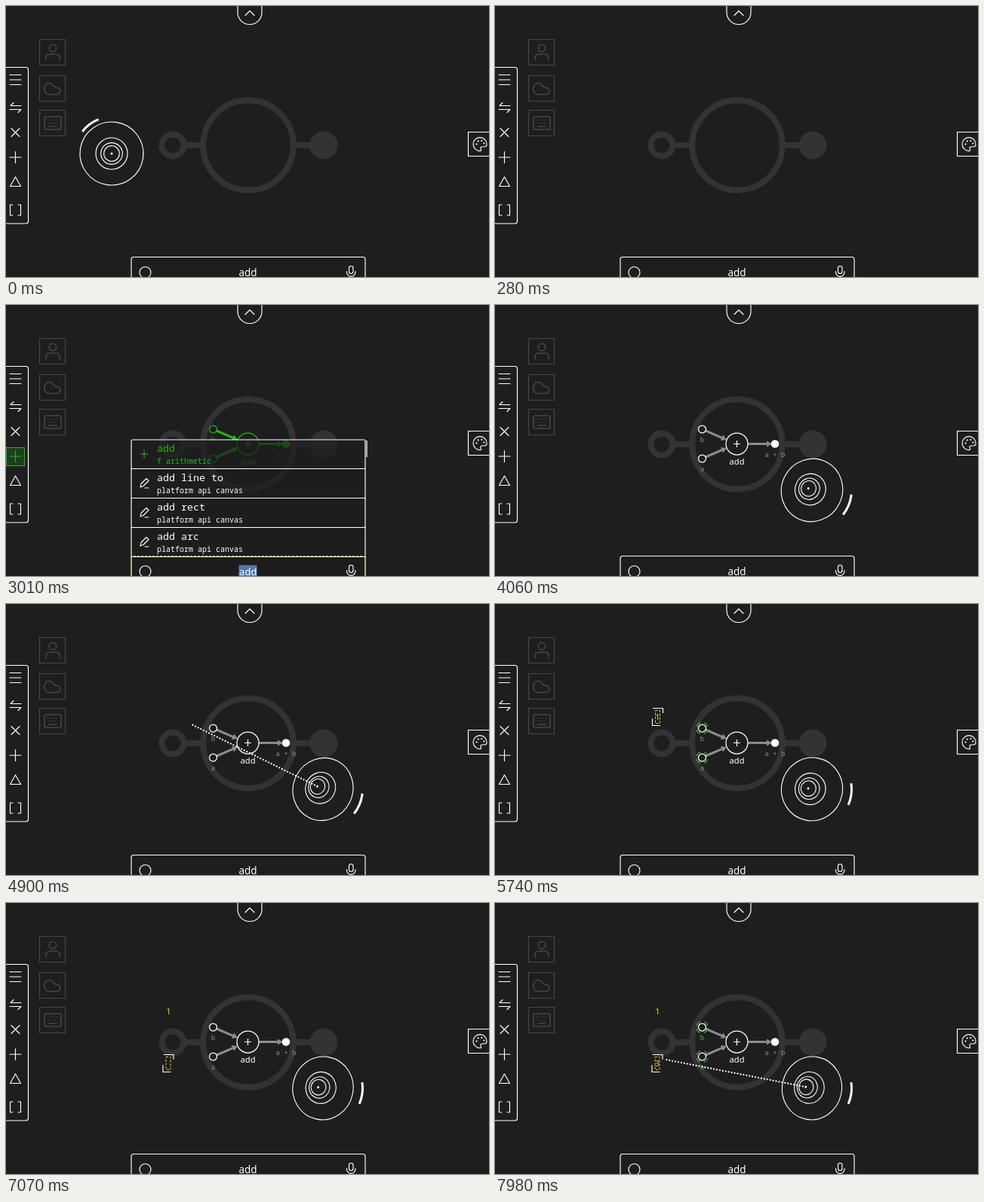
Write an HTML page that moves like this. It is 640x360 px and loops after 8 s.

```html
<!DOCTYPE html>
<html lang="en">
<head>
<meta charset="utf-8">
<title>Node editor</title>
<style>
  html, body { margin: 0; width: 100%; height: 100%; overflow: hidden; background: #1e1e1e; }
  svg { display: block; width: 640px; height: 360px; }
  text { font-family: "Noto Sans", "Open Sans", sans-serif; }
  .mono { font-family: "Noto Sans Mono", "DejaVu Sans Mono", monospace; }
  .mid { text-anchor: middle; }
  .line { fill: none; stroke: #fff; stroke-width: 1.15; stroke-linecap: round; stroke-linejoin: round; }
  .dim { stroke: #464646; }
  .green { stroke: #22b51e; }
  .tag { fill: #8c8c8c; font-size: 9px; }
  .value { fill: #e8ca4a; font-size: 11px; }
  .focus { fill: none; stroke: #e0c850; stroke-dasharray: 3 2; }
  .ring { fill: none; stroke: #2db52d; stroke-width: 1.2; }
  #graph { --ink: #fff; --wire: #8c8c8c; --tag: #8c8c8c; }
  #graph.fresh { --ink: #22b51e; --wire: #22b51e; --tag: #22801e; }
  #graph .tag { fill: var(--tag); }
  .port { fill: #1e1e1e; stroke: var(--ink); stroke-width: 1.25; }
  .wire { stroke: var(--wire); stroke-width: 3; }
  .tip { fill: var(--wire); }
</style>
</head>
<body>
<svg viewBox="0 0 640 360">
  <g fill="none" stroke="#333" stroke-width="8">
    <circle cx="321" cy="185" r="59.7"/>
    <circle cx="221" cy="185" r="14.5"/>
    <path d="M239 185H259M383 185H404"/>
    <circle cx="421" cy="185" r="18.5" fill="#333" stroke="none"/>
  </g>

  <g class="line dim">
    <path d="M44.5 44.5h34v34h-34zm0 48h34v34h-34zm0 46h34v34h-34z"/>
    <g stroke-width="1.6">
      <circle cx="62" cy="56" r="4.7"/>
      <path d="M53 72v-3q0-5 5-5h8q5 0 5 5v3"/>
      <path d="M57 117.500a6.500 7.500 0 1 1 6-11q2 .5 3 2h2a4.600 4.600 0 0 1 0 9z"/>
      <rect x="51" y="147" width="22" height="17" rx="2"/>
      <path d="M55 151.500H70M57 155.500H69" stroke-dasharray=".1 4"/>
      <path d="M57 160H67"/>
    </g>
  </g>

  <g class="line">
    <rect x="-5" y="81.5" width="34.5" height="207.5" rx="3"/>
    <path d="M5 91.500h15m-15 6.500h15m-15 6.500h15"/>
    <path d="M20 132.500H6l4-4M5 137.500h15l-4 4"/>
    <path d="M7 162.500l11 11m0-11l-11 11"/>
    <path d="M12.500 227l7 12.500h-14z"/>
    <path d="M9 264h-3.500v14h3.500m7-14h3.500v14h-3.500"/>
    <path d="M307-2V8.500a16 16 0 0 0 32 0V-2M317 12.500l6-6 6 6"/>
    <rect x="612.5" y="167.500" width="34" height="32"/>
    <path d="M629 192.500a9 9 0 1 1 8-8.500q0 3-3.500 3h-2.500q-2.500 0-2 2.500 1 2.500 0 3z"/>
    <path d="M623.500 183.500h.1m2-4h.1m4.500-.5h.1m3 3.500h.1" stroke-width="2.2"/>
  </g>
  <rect id="plus" class="green" x=".5" y="189.5" width="24" height="24" fill="#22b51e" fill-opacity=".2"/>
  <path id="plusMark" class="line" d="M5 201h15m-7.500-7.500v15"/>

  <g id="graph">
    <g id="wires"></g>
    <circle class="port" cx="274.5" cy="165" r="5"/>
    <circle class="port" cx="274.5" cy="204" r="5"/>
    <circle class="port" cx="320.5" cy="184.5" r="14.500"/>
    <circle cx="371" cy="184.5" r="5.3" style="fill:var(--ink)"/>
    <path d="M316 184.500h9m-4.500-4.500v9" style="stroke:var(--ink);stroke-width:1.2"/>
    <text class="mono tag mid" x="274.5" y="182">b</text>
    <text class="mono tag mid" x="274.5" y="221">a</text>
    <text class="mono tag mid" x="371" y="201.5">a + b</text>
    <text class="mid" x="320.5" y="212" font-size="11.2" style="fill:var(--ink)">add</text>
  </g>
  <g id="addRing"></g>
  <g id="portRings"></g>

  <g id="first">
    <g id="firstBox"></g>
    <text id="one" class="value mid" x="215.5">1</text>
  </g>
  <g id="second">
    <g id="secondBox"></g>
    <text id="three" class="value mid" x="215" y="217">3</text>
  </g>

  <g id="menu">
    <rect class="line" x="166" y="179" width="310" height="190" rx="2" style="fill:#1e1e1eb8"/>
    <path d="M478 180v22" stroke="#ddd" stroke-width="1.5"/>
    <g id="rows"></g>
  </g>

  <rect id="bar" x="166" y="333.5" width="310" height="40" rx="3"/>
  <g class="line">
    <circle cx="184.5" cy="354" r="7.5"/>
    <rect x="454.500" y="345.500" width="5.5" height="10" rx="2.7"/>
    <path d="M451.500 352.500v1a5.700 5.700 0 0 0 11.500 0v-1m-5.800 6.500v3"/>
  </g>
  <rect id="pick" x="308.5" y="345.5" width="24" height="17" fill="#4f79a8"/>
  <text id="query" class="mid" x="320.5" y="359" fill="#fff">add</text>

  <path id="beam" fill="none" stroke="#fff" stroke-width="2.3" stroke-linecap="round" stroke-dasharray="0 4"/>
  <g id="dial" class="line">
    <circle r="42"/><circle r="21"/><circle r="14.3"/><circle r="10.3"/>
    <circle r="1.5" fill="#fff" stroke="none"/>
    <path id="arc" stroke-width="3" stroke-linecap="butt"/>
  </g>
</svg>

<script>
const LOOP = 8000, STEP = 70;
const $ = id => document.getElementById(id);
const show = (id, on) => { $(id).style.display = on ? "" : "none"; };
const within = (t, from, to) => t >= from && t < to;
const clamp = k => Math.min(1, Math.max(0, k));
const ease = k => k * k * (3 - 2 * k);
const mix = (a, b, k) => a + (b - a) * k;

function arrow(x1, y1, x2, y2) {
  const len = Math.hypot(x2 - x1, y2 - y1);
  const turn = Math.atan2(y2 - y1, x2 - x1) * 180 / Math.PI;
  return `<g transform="translate(${x1} ${y1}) rotate(${turn})">
    <path class="wire" d="M0 0H${len - 5}"/>
    <path class="tip" d="M${len - 7} -4L${len} 0L${len - 7} 4Z"/></g>`;
}

function ring(x, y, r) {
  const q = Math.PI * r / 2;
  return `<circle class="ring" cx="${x}" cy="${y}" r="${r}"
    stroke-dasharray="${q * .6} ${q * .4}" stroke-dashoffset="${-q * .2}"/>`;
}

// Two open corners around a dashed field.
function editBox(x, y) {
  return `<g transform="translate(${x} ${y})">
    <path class="line" d="M1 0h13v6M0 14v9h10"/>
    <rect class="focus" x="4" y="3" width="6" height="17" stroke-dasharray="2 1.5"/></g>`;
}

function row(title, i) {
  const tone = i ? "" : "green";
  const fill = i ? "#fff" : "#22b51e";
  const note = i ? "platform api canvas" : "f arithmetic";
  const icon = i ? "M178 203l1-4.500 7-7 3 3-7 7zm6 1h5" : "M178 198h10m-5-5v10";
  return `<g transform="translate(0 ${i * 39})">
    <path class="line ${tone}" d="${icon}"/>
    <text class="mono" x="200" y="195" font-size="13.33" fill="${fill}">${title}</text>
    <text class="mono" x="200" y="211" font-size="10" fill="${fill}">${note}</text>
    <path class="line" d="M166 217.500h310"/></g>`;
}

$("rows").innerHTML = ["add", "add line to", "add rect", "add arc"].map(row).join("");
$("wires").innerHTML = arrow(279, 167, 307, 179) + arrow(279, 202, 307, 190) + arrow(335, 184.5, 367, 184.5);
$("addRing").innerHTML = ring(320.5, 184.5, 18);
$("portRings").innerHTML = ring(274.5, 165, 7.7) + ring(274.5, 204, 7.7);
$("firstBox").innerHTML = editBox(208.5, 138.5);
$("secondBox").innerHTML = editBox(208, 201.5);

// Two taps, then drags that pull the dial towards the place being edited.
function dialAt(t) {
  if (t < 2450) return { x: 140, y: 196, angle: 53, pull: 0, alpha: clamp(1 - t / 280), arc: 1 };
  if (t < 3850) {
    const alpha = clamp(Math.min((t - 2450) / 190, (3010 - t) / 280));
    return { x: 332, y: 230, angle: 0, pull: 0, alpha, arc: 0 };
  }
  const begin = [6720, 5670, 3920].find(s => t >= s) ?? 3920;
  const angle = begin === 3920 ? 206.3 : 191.5;
  const pull = mix(5, 8.4, ease(clamp((t - begin) / 770)));
  return { x: 420, y: 246, angle, pull, alpha: clamp((t - 3850) / 190), arc: 1 };
}

const dialRings = [...$("dial").querySelectorAll("circle")];

function drawDial(t) {
  const { x, y, angle, pull, alpha, arc } = dialAt(t);
  const polar = (r, deg) => {
    const a = deg * Math.PI / 180;
    return [x + r * Math.cos(a), y + r * Math.sin(a)];
  };
  const squash = 1 - pull * .0072;
  dialRings.forEach((c, i) => {
    const [rx, ry] = polar(pull * (1 - (1 - i / 4) ** 2), angle);
    c.setAttribute("transform", `translate(${rx} ${ry}) rotate(${angle}) scale(${squash} 1)`);
  });
  const r = pull ? 52.5 : 48.5;
  const mid = angle + (pull ? 176 : 180);
  $("arc").setAttribute("d", `M${polar(r, mid - 16)}A${r} ${r} 0 0 1 ${polar(r, mid + 16)}`);
  $("arc").style.opacity = arc;
  $("dial").style.opacity = alpha;
  return polar(pull, angle);
}

function drawBeam(t, [x, y]) {
  const early = t < 6000;
  const k = clamp(early ? (t - 4690) / 210 : (t - 7490) / 280);
  const [tx, ty] = early ? [247, 160.5] : [226, 208];
  show("beam", k > 0 && !within(t, 5180, 6000));
  $("beam").setAttribute("d", `M${x} ${y}L${mix(x, tx, k)} ${mix(y, ty, k)}`);
}

function draw(now) {
  const t = Math.floor(now % LOOP / STEP) * STEP;
  const open = within(t, 2520, 3290);
  ["menu", "plus", "pick"].forEach(id => show(id, open));
  $("plusMark").setAttribute("class", open ? "line green" : "line");
  $("bar").setAttribute("class", open ? "focus" : "line");
  $("query").setAttribute("class", open ? "mono mid" : "mid");
  $("query").setAttribute("font-size", open ? 13.33 : 13.5);

  show("graph", t >= 2520);
  $("graph").setAttribute("class", open ? "fresh" : "");
  show("addRing", within(t, 3290, 3920));
  show("portRings", within(t, 5670, 6510) || t >= 7980);

  const editing = t < 6580;
  show("first", t >= 5180);
  show("firstBox", editing);
  show("one", t >= 5670);
  $("one").setAttribute("y", editing ? 154 : 148);
  show("second", t >= 6720);
  show("three", t >= 7980);
  drawBeam(t, drawDial(t));
}

let start;
function tick(now) {
  start ??= now;
  draw(now - start);
  requestAnimationFrame(tick);
}
draw(0);
requestAnimationFrame(tick);
</script>
</body>
</html>
```
